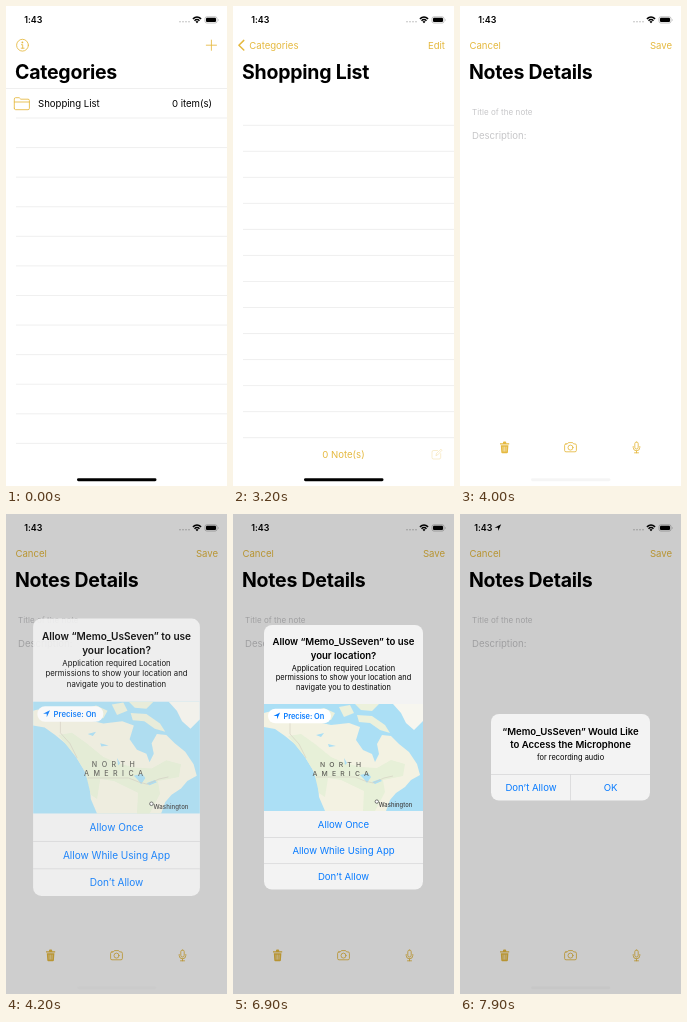
Write an HTML page that moves like this. It is 221 by 480 pixels and loops after 8000 ms.

```html
<!DOCTYPE html>
<html lang="en">
<head>
<meta charset="utf-8">
<title>Notes</title>
<style>
  html, body { margin: 0; width: 100%; height: 100%; overflow: hidden; background: #fff; }
  svg { display: block; width: 221px; height: 480px; }
  text { font: 400 9.6px Inter, Roboto, sans-serif; letter-spacing: -.02px; white-space: pre; }
  .title { font-size: 19.5px; font-weight: 700; letter-spacing: -.24px; }
  .time { font-size: 8.9px; font-weight: 600; }
  .gold { fill: #e5b93f; }
  .line { fill: none; stroke: #e5b93f; stroke-width: .85; stroke-linecap: round; stroke-linejoin: round; }
  .rule { stroke: #e4e4e5; stroke-width: .6; }
  .hint { fill: #c6c6c8; }
  .small { font-size: 8px; letter-spacing: .06px; }
  .mid { text-anchor: middle; }
  .end { text-anchor: end; }
  .head { font-weight: 600; }
  .msg { font-size: 7.4px; letter-spacing: .03px; }
  .blue { fill: #087bff; }
  .badge { font-size: 7.4px; font-weight: 600; }
  .split { stroke: #cfcfd1; stroke-width: .6; }
  .land { font-size: 6.8px; font-weight: 500; fill: #60605a; letter-spacing: 4.2px; }
  .city { font-size: 5.8px; font-weight: 500; fill: #3f3f3f; letter-spacing: .06px; }
</style>
</head>
<body>
<svg id="stage" viewBox="0 0 221 480"></svg>
<script>
const LOOP = 8000, STEP = 100, W = 221;
const APP = '“Memo_UsSeven”';

const text = (x, y, cls, s) => `<text x="${x}" y="${y}" class="${cls}">${s}</text>`;
const line = (d, extra = '') => `<path class="line" d="${d}" ${extra}/>`;
const group = (id, s) => `<g id="${id}">${s}</g>`;
const hr = (y, x1, x2, cls) => `<path class="${cls}" d="M${x1} ${y}H${x2}"/>`;
const rules = (y, gap, n) =>
  Array.from({ length: n }, (_, i) => hr(y + i * gap, 10, W, 'rule')).join('');
const page = (id, s) =>
  group(id, `<rect width="${W}" height="480" fill="#fff"/>${s}
    <rect class="shade" width="${W}" height="480" opacity="0"/>`);

const arrow = (x, y) =>
  `<path d="M${x} ${y + 3.4}L${x + 6.6} ${y}L${x + 3.5} ${y + 6.7}V${y + 3.4}Z"/>`;

const home = page('homePage',
  hr(82.5, 0, W, 'rule') + rules(112, 29.58, 12) +
  line('M8.3 102V93Q8.3 91.7 9.6 91.7H13.2L14.8 93.2H22Q23.4 93.2 23.4 94.5V102.3Q23.4 103.7 22 103.7H9.7Q8.3 103.7 8.3 102.3ZM8.3 96H23.4') +
  text(32, 101.3, '', 'Shopping List') + text(206, 101.3, 'end', '0 item(s)'));

const list = page('listPage',
  group('rows', rules(114.3, 26.03, 13)) + text(110.5, 451.6, 'gold mid', '0 Note(s)') +
  group('compose', line('M204.5 444.5H200.6Q199 444.5 199 446V451.4Q199 453 200.6 453H206.2Q207.7 453 207.7 451.4V447.6M203 449.3L203.5 447.4L208 443.2L209 444.2L204.8 448.7Z')));

const note = page('notePage',
  text(12, 109.2, 'hint small', 'Title of the note') + text(12, 133.3, 'hint', 'Description:') +
  `<path class="gold" d="M40 437.3H43V436.6Q43 435.6 44 435.6H45.2Q46.2 435.6 46.2 436.6V437.3H49.2V438.6H40ZM40.8 439.2H48.4L47.9 446.3Q47.8 447.2 46.9 447.2H42.3Q41.4 447.2 41.3 446.3Z"/>
   <path d="M43 440.7L43.2 445.6M44.6 440.7V445.6M46.2 440.7L46 445.6" stroke="#fff" stroke-width=".5"/>` +
  line('M106 437.9H107.4L108.4 436.6H112.6L113.6 437.9H115Q116.4 437.9 116.4 439.3V444.4Q116.4 445.8 115 445.8H106Q104.6 445.8 104.6 444.4V439.3Q104.6 437.9 106 437.9Z') +
  '<circle class="line" cx="110.5" cy="441.6" r="2.5"/>' +
  '<rect class="line" x="174.8" y="436" width="3.4" height="7" rx="1.7"/>' +
  line('M173.2 440.5V441.4Q173.2 444.8 176.5 444.8Q179.8 444.8 179.8 441.4V440.5M176.5 444.8V446.8M174.5 446.8H178.5'));

const navs =
  group('homeNav', `<circle class="line" cx="16.5" cy="39.2" r="5.9"/>
    <circle class="gold" cx="16.4" cy="36.4" r=".9"/>` +
    line('M15.4 38.7H16.7V42.2M15.2 42.2H18.1') + line('M200.3 39.2H210.5M205.4 34.1V44.3')) +
  group('chevron', line('M10.8 34.4L5.9 39.2L10.8 44', 'style="stroke-width:1.5"')) +
  group('listNav', text(16.3, 42.6, 'gold', 'Categories') + text(212, 42.6, 'gold end', 'Edit')) +
  group('noteNav', text(9.5, 42.6, 'gold', 'Cancel') + text(212, 42.6, 'gold end', 'Save'));

const titles = [['home', 'Categories'], ['list', 'Shopping List'], ['note', 'Notes Details']]
  .map(([id, s]) => group(id + 'Title', text(9, 73.3, 'title', s))).join('');

const status = group('clock', text(18.3, 17, 'time', '1:43')) + group('locArrow', arrow(34.6, 10.3)) +
  [174, 177, 180, 183].map(x => `<circle cx="${x}" cy="15.7" r=".8" fill="#bbb"/>`).join('') +
  `<g fill="none" stroke="#000" stroke-width="1.5">
    <path d="M186.9 12.9Q191 9.2 195.1 12.9M188.5 14.7Q191 12.4 193.5 14.7"/></g>
   <path d="M189.5 15.7Q191 14.5 192.5 15.7L191 17.3Z"/>
   <rect x="199" y="10.8" width="12" height="6.2" rx="1.8" fill="none" stroke="#999" stroke-width=".6"/>
   <rect x="200" y="11.8" width="10" height="4.2" rx="1"/>
   <path d="M212 12.9Q213.3 13.9 212 14.9Z" fill="#999"/>`;

const card = (y, h) => `<rect x="31" y="${y}" width="159" height="${h}" rx="8" fill="#f3f3f3"/>`;
const centred = (cls, rows) => rows.map(([y, s]) => text(110.5, y, 'mid ' + cls, s)).join('');

const mic = group('mic', card(200, 86.5) +
  centred('head', [[220.8, `${APP} Would Like`], [234, 'to Access the Microphone']]) +
  centred('msg', [[246.2, 'for recording audio']]) +
  hr(260.5, 31, 190, 'split') + '<path class="split" d="M110.5 260.5V286.5"/>' +
  text(71, 277, 'mid blue', 'Don’t Allow') + text(150.5, 277, 'mid blue', 'OK'));

const map = `<g clip-path="url(#mapBox)">
  <rect x="31" y="190" width="159" height="107" fill="#abdff5"/>
  <path fill="#f3f2e2" d="M31 199Q38 196 47 199L62 203L80 207L98 211L116 209L127 213L123 226L130 236L139 240L142 248L146 240L144 230L149 221L158 222L166 230L176 238L184 250L187 261L178 266L172 273L163 279L157 286L153 297H92L86 283L85 270L80 256L72 243L63 231L52 222L42 215L31 213Z"/>
  <path fill="#e7f0d8" d="M55 222L68 220L82 230L98 243L112 249L128 253L144 254L158 246L172 250L170 262L150 266L152 278L142 297H130L131 277L108 266L95 264L92 283L86 279L81 258L72 243Z"/>
  <path fill="#ecf1dc" d="M78 198L91 194L102 199L98 206L84 206ZM106 193L117 191L121 199L111 203ZM124 201L139 202L152 211L157 219L147 216L137 209L126 208ZM122 190H146L139 197L128 196Z"/>
  <path fill="#f7f6ef" d="M160 190H190V207L181 216L173 209L168 199Z"/>
  <path fill="#abdff5" d="M127 261L135 259L138 263L134 269L131 265ZM139 268L147 265L149 267L142 270ZM83 221L91 219L88 223ZM95 230L103 232L96 233ZM111 244L114 249L112 251Z"/>
  <path fill="none" stroke="#d3cdbf" stroke-width=".6" d="M57 202V220L66 230L73 244M83 263H122L132 267L140 269L151 264L160 262"/>
  ${text(87, 253, 'land', 'NORTH')}${text(79.5, 261.6, 'land', 'AMERICA')}
  <circle cx="143.8" cy="287.6" r="1.7" fill="#fff" stroke="#555" stroke-width=".8"/>
  ${text(145.8, 292.6, 'city', 'Washington')}
  <rect x="35" y="194.7" width="63" height="14.6" rx="7.3" fill="#fff"/>
  <g class="blue">${arrow(40.5, 198.5)}</g>${text(50.5, 204.7, 'blue badge', 'Precise: On')}
</g>`;

const loc = group('loc', card(111, 264.5) +
  centred('head', [[131.3, `Allow ${APP} to use`], [145, 'your location?']]) +
  centred('msg', [[156.6, 'Application required Location'],
    [166.2, 'permissions to show your location and'], [175.9, 'navigate you to destination']]) + map +
  [323.5, 349.6].map(y => hr(y, 31, 190, 'split')).join('') +
  centred('blue', [[313.6, 'Allow Once'], [339.8, 'Allow While Using App'], [366, 'Don’t Allow']]));

document.getElementById('stage').innerHTML =
  '<defs><clipPath id="mapBox"><rect x="31" y="190" width="159" height="107"/></clipPath></defs>' +
  home + list + note + titles + navs + status +
  '<rect id="bar" x="71" y="472.3" width="79.5" height="2.9" rx="1.45"/>' +
  `<rect id="dim" width="${W}" height="480"/>` + mic + loc;

const el = id => document.getElementById(id);
const fade = (id, o) => {
  el(id).style.display = o > 0 ? '' : 'none';
  el(id).setAttribute('opacity', o);
};
const shift = (id, x, y = 0) => el(id).setAttribute('transform', `translate(${x} ${y})`);
const clamp = v => Math.min(1, Math.max(0, v));
const ramp = (t, a, b) => clamp((t - a) / (b - a));
const decay = (t, from) => Math.min(1, Math.exp((from - t) / 200));

// Critically damped spring, settled after half a second.
function spring(ms) {
  if (ms <= 0) return 0;
  if (ms >= 500) return 1;
  const k = ms * .0151;
  return 1 - (1 + k) * Math.exp(-k);
}

// a: progress of arriving, b: progress of being covered by the next screen
function screen(name, a, b) {
  const leave = clamp(1 - 1.4 * b);
  fade(name + 'Page', a > 0 && b < 1 ? 1 : 0);
  shift(name + 'Page', W * (1 - a) - 66 * b);
  el(name + 'Page').querySelector('.shade').setAttribute('opacity', .09 * b);
  fade(name + 'Title', a > 0 ? leave : 0);
  shift(name + 'Title', 256 * (1 - a) - 66 * b);
  fade(name + 'Nav', a * leave);
}

function pop(id, cy, p, opacity) {
  const s = 1 + .25 * (1 - p);
  fade(id, clamp(p * 1.1) * opacity);
  el(id).setAttribute('transform', `translate(110.5 ${cy}) scale(${s}) translate(-110.5 ${-cy})`);
}

function draw(now) {
  const t = Math.floor(now % LOOP / STEP) * STEP;
  const toList = spring(t - 1100), toNote = spring(t - 3300);
  screen('home', 1, toList);
  screen('list', toList, toNote);
  screen('note', toNote, 0);
  fade('chevron', toList * (1 - toNote));
  shift('rows', 0, t >= 3200 ? 5 : 0);
  fade('compose', t >= 3200 && t < 3400 ? .3 : 1);

  const again = t >= 7400;
  const micIn = spring(t - (again ? 7400 : 3300));
  const micOn = again ? 1 : 1 - ramp(t, 3700, 4000);
  const locIn = spring(t - 4000);
  const locOn = t < 7300 ? 1 : again ? 0 : .05;
  pop('mic', 243.2, micIn, micOn);
  pop('loc', 243.2, locIn, locOn);
  fade('dim', .2 * Math.max(micIn * micOn, t < 7300 ? clamp(locIn * 1.2) : 0));

  const located = t >= 7500;
  fade('locArrow', located ? 1 : 0);
  shift('clock', located ? -4 : 0);
  fade('bar', t < 7300 ? decay(t, 3360) : decay(t, 7160));
}

const start = performance.now();
(function tick() {
  draw(performance.now() - start);
  requestAnimationFrame(tick);
})();
</script>
</body>
</html>
```
